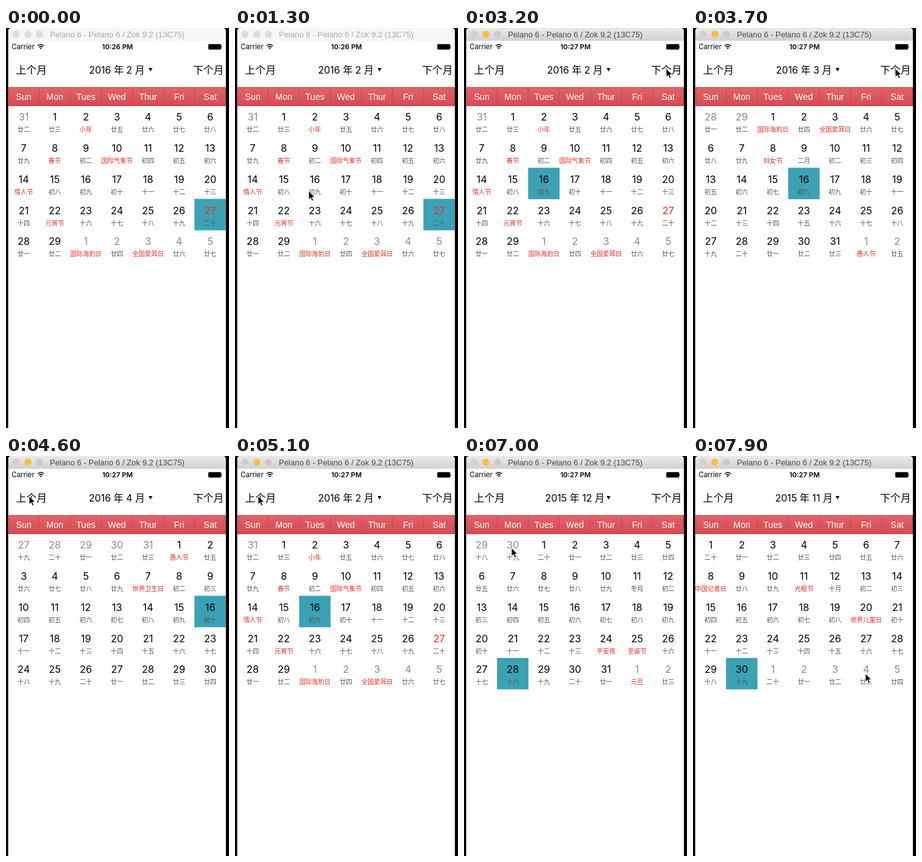
An HTML page for the animation above (8 s loop, 357 by 640 pixels).

```html
<!DOCTYPE html>
<html lang="zh-CN">
<head>
<meta charset="utf-8">
<title>Calendar</title>
<style>
html, body { margin: 0; width: 100%; height: 100%; overflow: hidden; background: #000; }
svg { display: block; width: 357px; height: 640px; }
text { font-family: Inter, "Noto Sans CJK SC", "Noto Sans CJK", sans-serif; text-anchor: middle; }
.bar { font-family: "Liberation Sans", sans-serif; }
.big { font-size: 16.4px; }
.num { font-size: 16px; }
.sub { font-size: 10.1px; fill: #555; }
.grey { fill: #8b8b8b; }
.red { fill: #ee2a20; }
</style>
</head>
<body>
<svg viewBox="0 0 357 640">
  <defs>
    <linearGradient id="chrome" x2="0" y2="1"><stop stop-color="#ebe9eb"/><stop offset="1" stop-color="#d2d0d2"/></linearGradient>
    <linearGradient id="week" x2="0" y2="1"><stop stop-color="#e06468"/><stop offset="1" stop-color="#d74a52"/></linearGradient>
  </defs>
  <rect x="3.5" y="20" width="348.5" height="620" fill="#fff"/>
  <path id="top" d="M3.5 20.5V5q0-5 5-5h338.5q5 0 5 5v15.5z"/>
  <g id="dots"><circle cx="16" cy="10" r="5.7"/><circle cx="35" cy="10" r="5.7"/><circle cx="53.5" cy="10" r="5.7"/></g>
  <text id="title" class="bar" x="178" y="14.7" font-size="12.8">Pelano 6 - Pelano 6 / Zok 9.2 (13C75)</text>

  <text x="27.3" y="34" font-size="11.2">Carrier</text>
  <g fill="none" stroke="#000" stroke-width="1.5">
    <path d="M50.7 28.5q5-4.6 10 0M52.7 30.7q3-2.6 6 0"/>
    <path d="M54.2 32.2q1.5-1.2 3 0l-1.5 1.7z" fill="#000" stroke="none"/>
  </g>
  <text id="clock" x="178.5" y="34" font-size="11" font-weight="600"></text>
  <rect x="323.8" y="25.7" width="20.8" height="8.8" rx="1.7"/>
  <path d="M345.2 28.4q1.8 1.7 0 3.4z"/>

  <text class="big" x="40.7" y="73">上个月</text>
  <text class="big" x="324" y="73">下个月</text>
  <text id="month" x="177.5" y="73" font-size="15.6"></text>
  <path d="M228.3 64h6.2l-3.1 5.8z"/>

  <rect x="4" y="95" width="347.5" height="29.5" fill="url(#week)" stroke="#b5474d"/>
  <g id="names"></g>
  <g id="days"></g>
  <path id="cursor" d="M0 0V13.5L3.2 10.6 5.3 15.6 7.6 14.6 5.5 9.8H9.7Z" stroke="#fff" stroke-width=".9"/>
</svg>
<script>
const LOOP = 8000, DAY = 864e5, CELL = 49.75, LEFT = 3.5, TOP = 124.5;
const $ = id => document.getElementById(id);
const utc = (y, m, d) => Date.UTC(y, m - 1, d);

// start time, year, month, selected day
const views = [
  [0, 2016, 2, 27], [2100, 2016, 2, 16], [3600, 2016, 3, 16], [3900, 2016, 4, 16],
  [4700, 2016, 3, 16], [5000, 2016, 2, 16], [5400, 2016, 1, 16],
  [6900, 2015, 12, 28], [7200, 2015, 11, 30]
];
// time, x, y of the pointer tip
const path = [
  [100, 340, 400], [900, 200, 499], [1300, 118, 261], [2600, 118, 261], [3200, 324, 65],
  [4000, 324, 65], [4600, 37, 64], [5600, 37, 64], [5900, 179, 103], [6300, 130, 150],
  [6450, 130, 150], [6800, 76, 147], [7200, 76, 147], [7700, 266, 371], [7900, 276, 348]
];
const activeAt = 1900;
const today = utc(2016, 2, 27);
const holidays = {
  '1/1': '元旦', '1/17': '腊八节', '2/2': '小年', '2/8': '春节', '2/10': '国际气象节',
  '2/14': '情人节', '2/22': '元宵节', '3/1': '国际海豹日', '3/3': '全国爱耳日', '3/8': '妇女节',
  '4/1': '愚人节', '4/7': '世界卫生日', '11/8': '中国记者日', '11/11': '光棍节',
  '11/20': '世界儿童日', '12/24': '平安夜', '12/25': '圣诞节'
};
// first days of the lunar months
const moons = [
  [utc(2015, 10, 13), '九月'], [utc(2015, 11, 12), '十月'], [utc(2015, 12, 11), '冬月'],
  [utc(2016, 1, 10), '腊月'], [utc(2016, 2, 8), '正月'], [utc(2016, 3, 9), '二月'], [utc(2016, 4, 7), '三月']
];

function lunar(date) {
  const [start, name] = moons.findLast(m => m[0] <= date);
  const n = (date - start) / DAY + 1;
  if (n === 1) return name;
  if (n === 20) return '二十';
  if (n === 30) return '三十';
  return '初十廿'[Math.floor((n - (n === 10)) / 10)] + '十一二三四五六七八九'[n % 10];
}

const label = (cls, x, y, s) => `<text class="${cls}" x="${x}" y="${y}">${s}</text>`;

function drawMonth([, year, month, selected]) {
  $('month').textContent = `${year} 年 ${month} 月`;
  const first = utc(year, month, 1), lead = new Date(first).getUTCDay();
  const length = (utc(year, month + 1, 1) - first) / DAY;
  const count = Math.ceil((lead + length) / 7) * 7;
  let out = '';
  for (let i = 0; i < count; i++) {
    const time = first + (i - lead) * DAY, date = new Date(time);
    const m = date.getUTCMonth() + 1, d = date.getUTCDate(), own = m === month;
    const x = LEFT + i % 7 * CELL, y = TOP + Math.floor(i / 7) * CELL, mid = x + CELL / 2;
    const holiday = holidays[m + '/' + d];
    if (own && d === selected) {
      out += `<rect x="${x - 0.4}" y="${y - 0.4}" width="${CELL + 0.6}" height="${CELL + 0.6}" fill="#3ba1b5"/>`;
    }
    out += label('num ' + (time === today ? 'red' : own ? '' : 'grey'), mid, y + 23.9, d);
    out += label('sub ' + (holiday ? 'red' : ''), mid, y + 41.8, holiday || lunar(time));
  }
  $('days').innerHTML = out;
}

function drawChrome(active) {
  $('top').setAttribute('fill', active ? 'url(#chrome)' : '#f6f6f6');
  $('title').setAttribute('fill', active ? '#4c4c4c' : '#aaa');
  const colours = active ? ['#d3cfd0', '#fdbd41', '#cbc9cb'] : ['#dcdcdc', '#dcdcdc', '#dcdcdc'];
  [...$('dots').children].forEach((dot, i) => dot.setAttribute('fill', colours[i]));
  $('clock').textContent = active ? '10:27 PM' : '10:26 PM';
}

function pointer(t) {
  const i = path.findIndex(p => p[0] > t);
  if (i < 0) return path.at(-1).slice(1);
  const [t0, x0, y0] = path[i - 1], [t1, x1, y1] = path[i];
  const u = (t - t0) / (t1 - t0), k = u * u * (3 - 2 * u);
  return [x0 + (x1 - x0) * k, y0 + (y1 - y0) * k];
}

$('names').innerHTML = ['Sun', 'Mon', 'Tues', 'Wed', 'Thur', 'Fri', 'Sat'].map((name, i) => {
  const x = LEFT + i * CELL;
  return (i ? `<path d="M${x} 96v28" stroke="#c9464e"/>` : '') +
    `<text class="bar" x="${x + CELL / 2}" y="115" font-size="14" fill="#fff">${name}</text>`;
}).join('');

let shownView, shownActive;
function frame(now) {
  const t = now % LOOP;
  const view = views.findLast(v => v[0] <= t), active = t >= activeAt;
  if (view !== shownView) drawMonth(shownView = view);
  if (active !== shownActive) drawChrome(shownActive = active);
  const visible = t >= path[0][0];
  $('cursor').setAttribute('visibility', visible ? 'visible' : 'hidden');
  if (visible) $('cursor').setAttribute('transform', `translate(${pointer(t)})`);
}
const begin = performance.now();
function tick() {
  frame(performance.now() - begin);
  requestAnimationFrame(tick);
}
tick();
</script>
</body>
</html>
```
